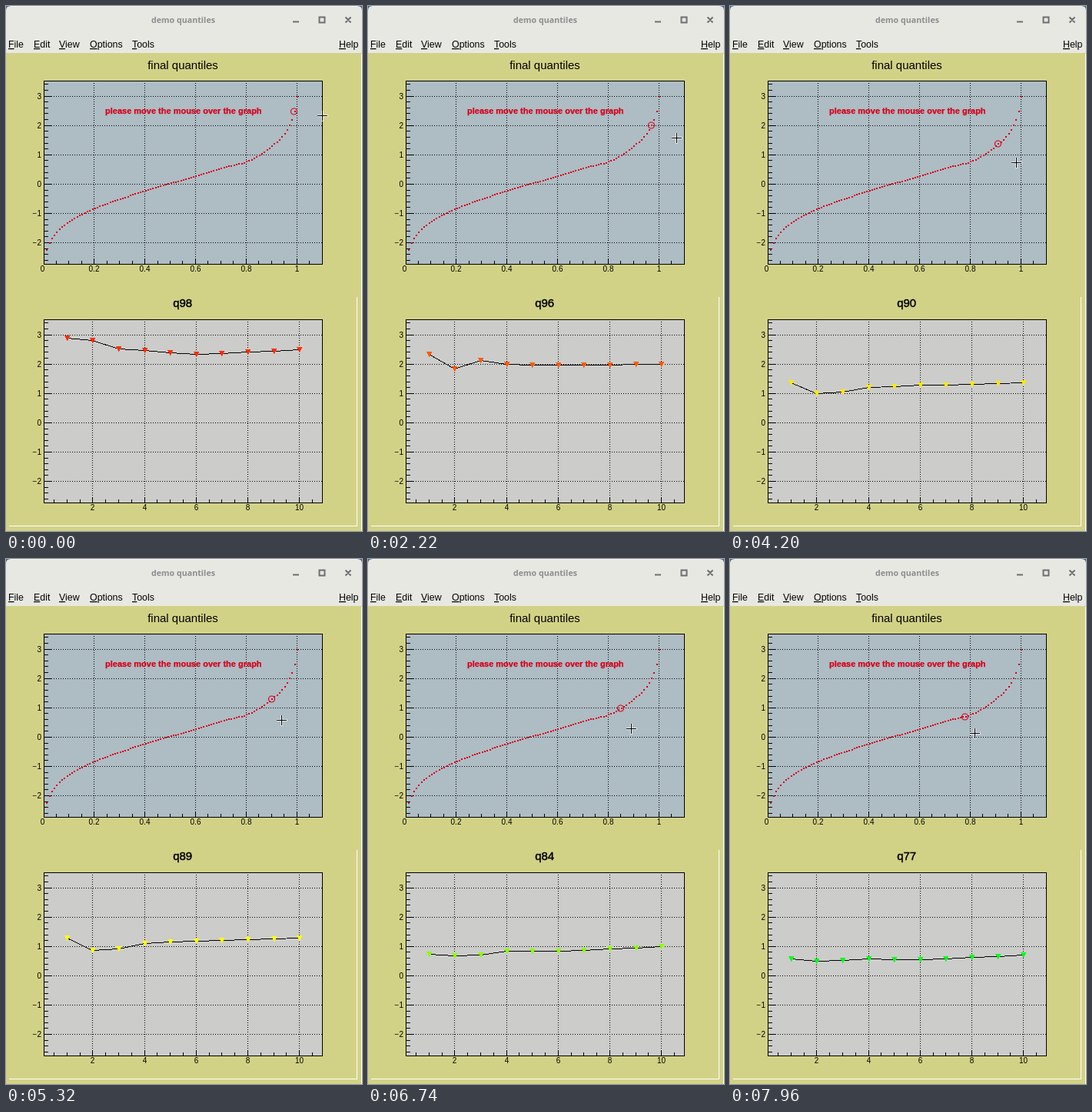
Animation, 463 px wide and 682 px high, one loop 8000 ms. Source, as an HTML page:

```html
<!DOCTYPE html>
<html lang="en">
<head>
<meta charset="utf-8">
<title>demo quantiles</title>
<style>
  html, body { margin: 0; width: 100%; height: 100%; overflow: hidden; background: #d2d287; }
  svg { display: block; width: 100vw; height: 100vh; }
  text { font-family: "Liberation Sans", Arial, sans-serif; fill: #000; }
  .crisp { shape-rendering: crispEdges; }
  .tick { font-size: 10px; }
  .head { font-size: 15px; text-anchor: middle; }
  .menu { font-size: 12.4px; }
  .menu tspan { text-decoration: underline; }
</style>
</head>
<body>
<svg id="stage" viewBox="0 0 463 682"></svg>
<script>
const LOOP = 8000;
const UNIT = 38.1;
const RED = '#d4001a';
const stage = document.getElementById('stage');

function add(parent, tag, attrs, text) {
  const el = document.createElementNS('http://www.w3.org/2000/svg', tag);
  for (const k in attrs) el.setAttribute(k, attrs[k]);
  if (text !== undefined) el.textContent = text;
  parent.appendChild(el);
  return el;
}
const path = (parent, d, stroke, extra) =>
  add(parent, 'path', { d, stroke, fill: 'none', ...extra });
const snap = v => Math.floor(v) + 0.5;
const range = (n, f) => Array.from({ length: n }, (_, i) => f(i));

// Linear interpolation through rows sorted by their first value
function lerpRows(rows, key) {
  let i = 1;
  while (i < rows.length - 1 && rows[i][0] < key) i++;
  const a = rows[i - 1], b = rows[i];
  const f = Math.max(0, Math.min(1, (key - a[0]) / (b[0] - a[0])));
  return a.slice(1).map((v, j) => v + (b[j + 1] - v) * f);
}

// Time, mouse position
const mouseKeys = [
  [540, 411, 142], [820, 408, 147], [1380, 405, 152], [2220, 401, 171],
  [2500, 398, 180], [3060, 389, 188], [3620, 379, 200], [5300, 358, 209],
  [6700, 342, 220], [7260, 334, 221], [7820, 318, 226]
];
// Time, quantile index under the mouse
const pickKeys = [
  [820, 98], [1100, 97], [1380, 97], [2500, 95], [3340, 95], [3620, 90],
  [5020, 90], [5160, 89], [5300, 89], [6700, 84], [7120, 81], [7260, 80], [7820, 77]
];
// Quantile index, pixel offsets from the final value after 1, 2, 3, 4 and 6 rounds
const driftKeys = [
  [77, -5, -8, -7, -5, -6], [84, -10, -12, -11, -6, -6],
  [89, 0, -16, -14, -7, -4], [95, -3, -6, -1, 0, -1],
  [97, 28, -7, 10, -1, -2], [98, 15, 12, 1, -1, -6]
];

// The mouse is sampled on a fixed beat
const beat = (t, step) => 820 + Math.floor((t - 820) / step) * step;
const mouseAt = t => lerpRows(mouseKeys, beat(t, 280)).map(Math.round);
const pickAt = t => Math.round(lerpRows(pickKeys, beat(t, 140))[0]);

// Sampled normal quantiles: smooth body, heavy right tail, a dent near 0.8
const quantile = p => 0.03
  + 5.06 * ((p + 0.004) ** 0.14 - (1.006 - p) ** 0.14)
  + 0.35 * p ** 40
  - 0.12 * Math.exp(-(((p - 0.81) / 0.08) ** 2));

// Estimate after round k settles on the final value at round 10
function estimateY(q, k) {
  const [d1, d2, d3, d4, d6] = lerpRows(driftKeys, q);
  const [d] = lerpRows([[1, d1], [2, d2], [3, d3], [4, d4], [6, d6], [10, 0]], k);
  return 541.5 - UNIT * quantile((q + 1) / 100) - d;
}

const topX = p => 49 + 329 * p;
const topY = p => 231.5 - UNIT * quantile(p);
const lowX = k => 45.6 + 33.6 * k;

function drawWindow() {
  add(stage, 'rect', { width: 463, height: 682, fill: '#d2d287' });
  add(stage, 'rect', { width: 463, height: 12, fill: '#3f6d9c' });
  add(stage, 'path', { d: 'M0 61V6Q0 0 6 0H457Q463 0 463 6V61Z', fill: '#e8e8e3' });
  path(stage, 'M6 .5H457', '#f5f5f2');
  add(stage, 'text', {
    x: 230.5, y: 22, 'text-anchor': 'middle',
    style: 'font:700 10.7px "Open Sans",sans-serif;fill:#8b8e8f'
  }, 'demo quantiles');
  path(stage, 'M373 20.5H381M407.5 14.5H414.5V21.5H407.5ZM441.5 14.5L448.5 21.5M448.5 14.5L441.5 21.5',
    '#6d7073', { 'stroke-width': 2 });
  const menus = [['File', 3], ['Edit', 36], ['View', 69], ['Options', 109], ['Tools', 164], ['Help', 433]];
  for (const [word, x] of menus) {
    const label = add(stage, 'text', { x, y: 54, class: 'menu' });
    add(label, 'tspan', {}, word[0]);
    label.append(word.slice(1));
  }
  path(stage, 'M456.5 378V675.5H4M462.5 62V682', '#fff', { class: 'crisp' });
}

function drawPlot(top, fill, xs, minorXs) {
  const g = add(stage, 'g', { class: 'crisp' });
  const bottom = top + 238;
  add(g, 'rect', { x: 49.5, y: top + 0.5, width: 362, height: 238, fill, stroke: '#000' });
  let grid = '', ticks = '';
  for (let i = -13; i <= 17; i++) {
    const v = i / 5, major = i % 5 === 0;
    const y = snap(top + 134.4 - UNIT * v);
    ticks += `M50 ${y}h${major ? 9 : 5}`;
    if (!major) continue;
    grid += `M50 ${y}H411`;
    add(stage, 'text', { x: 46, y: y + 3.5, class: 'tick', 'text-anchor': 'end' },
      v < 0 ? '\u2212' + -v : v);
  }
  for (const [x, name] of xs) {
    grid += `M${snap(x)} ${bottom}V${top + 1}`;
    ticks += `M${snap(x)} ${bottom}v-7`;
    add(stage, 'text', { x: snap(x), y: bottom + 9.5, class: 'tick', 'text-anchor': 'middle' }, name);
  }
  for (const x of minorXs) ticks += `M${snap(x)} ${bottom}v-4`;
  path(g, grid, '#000', { 'stroke-dasharray': '1 2' });
  path(g, ticks, '#000');
}

drawWindow();
drawPlot(97, '#aebcc4', range(5, i => [topX((i + 1) / 5), (i + 1) / 5]), range(21, i => topX((i + 1) / 20)));
drawPlot(407, '#cccccb', range(5, i => [lowX(2 * i + 2), 2 * i + 2]), range(21, i => lowX((i + 1) / 2)));
add(stage, 'text', { x: 47.5, y: 344.5, class: 'tick', 'text-anchor': 'middle' }, '0');
add(stage, 'text', { x: 230, y: 82, class: 'head' }, 'final quantiles');
add(stage, 'text', {
  x: 129, y: 140, style: `font-size:11px;font-weight:700;fill:${RED};stroke:${RED};stroke-width:.25`
}, 'please move the mouse over the graph');

const dots = add(stage, 'g', { class: 'crisp', fill: RED });
for (let i = 1; i <= 100; i++) {
  const p = i / 100;
  add(dots, 'rect', { x: Math.round(topX(p)), y: Math.round(topY(p)) - 1, width: 2, height: 2 });
}

const title = add(stage, 'text', {
  x: 229.7, y: 391, class: 'head', stroke: '#000', 'stroke-width': 0.45
});
const line = path(stage, '', '#000', { class: 'crisp' });
const marks = add(stage, 'path', { class: 'crisp' });
const ring = add(stage, 'circle', { r: 4, fill: 'none', stroke: RED, 'stroke-width': 1.2 });
const cursor = add(stage, 'g', { class: 'crisp' });
path(cursor, 'M-6.5 .5H7.5M.5 -6.5V7.5', '#fff', { 'stroke-width': 3, 'stroke-opacity': 0.65 });
path(cursor, 'M-6 .5H7M.5 -6V7', '#000');

function draw(t) {
  const p = (pickAt(t) + 1) / 100;
  ring.setAttribute('cx', snap(topX(p)));
  ring.setAttribute('cy', Math.round(topY(p)));

  // The lower plot redraws a moment after the ring
  const q = pickAt(t - 40);
  const pts = range(10, i => [snap(lowX(i + 1)), snap(estimateY(q, i + 1))]);
  title.textContent = 'q' + q;
  line.setAttribute('d', 'M' + pts.join('L'));
  marks.setAttribute('d', pts.map(([x, y]) => `M${x - 4} ${y - 4}h8l-4 8z`).join(''));
  marks.setAttribute('fill', `hsl(${60 + (89 - q) * 5.5} 100% 50%)`);

  cursor.setAttribute('transform', `translate(${mouseAt(t)})`);
}

const start = performance.now();
function tick() {
  draw((performance.now() - start) % LOOP);
  requestAnimationFrame(tick);
}
tick();
</script>
</body>
</html>
```
